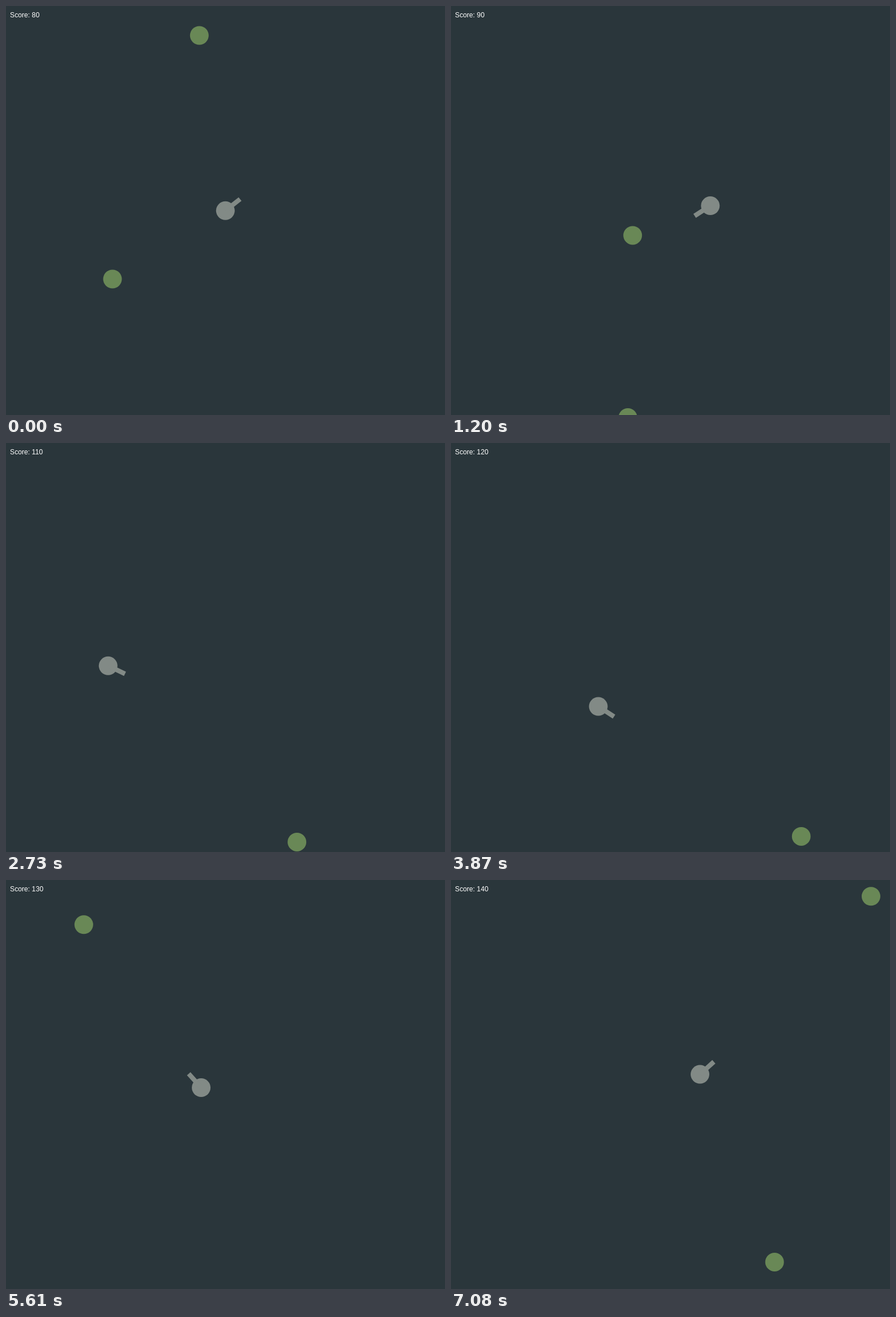
An HTML page with a canvas that plays this animation: 775 by 722 pixels, repeating every 7110 ms.

```html
<!DOCTYPE html>
<html lang="en">
<head>
<meta charset="utf-8">
<title>Arena shooter</title>
<style>
  html, body { margin: 0; width: 100%; height: 100%; overflow: hidden; background: #2a363b; }
  canvas { display: block; }
</style>
</head>
<body>
<canvas id="stage" width="775" height="722"></canvas>
<script>
const W = 775, H = 722, R = 16.5;
const LOOP = 7110, TICK = 30, STEP = 10;
const RUN = 0.25, CHASE = 0.128; // px per ms
const ctx = document.getElementById('stage').getContext('2d');

// Held movement keys: [from, to] in ms
const keys = {
  left: [[1288, 2421], [5200, 5362], [6242, 6494]],
  right: [[918, 1223], [3551, 3974], [4640, 5036], [5610, 6242]],
  up: [[950, 985], [1500, 1744], [4866, 5288], [5630, 5742]],
  down: [[2323, 3017], [3900, 3928], [6480, 6498]]
};

// Where the mouse rests: [time, x, y]
const mouse = [
  [0, 640, 162], [700, 345, 150], [900, 345, 165], [1200, 320, 442],
  [2200, 320, 570], [2730, 440, 518], [3870, 440, 581], [4560, 440, 560],
  [5610, 200, 205], [6480, 215, 215], [7080, 640, 162]
];

const enemies = [
  { born: 0, shot: 900, x: 341.3, y: 52 },
  { born: 0, shot: 1320, x: 188, y: 482 },
  { born: 1100, shot: 2520, x: 308, y: H + R },
  { born: 2365, shot: 3660, x: 545.5, y: H + R },
  { born: 3230, shot: 4440, x: 690, y: 734 },
  { born: 4710, shot: 6300, x: 73, y: -R },
  { born: 6541, shot: LOOP, x: 596.7, y: H + R },
  { born: 6590, shot: LOOP, x: 784.9, y: -R }
];

const clamp = (v, lo, hi) => Math.min(hi, Math.max(lo, v));
const held = (spans, t) => spans.reduce((sum, [from, to]) => sum + clamp(t, from, to) - from, 0);

function playerAt(t) {
  return {
    x: 387.3 + RUN * (held(keys.right, t) - held(keys.left, t)),
    y: 361.3 + RUN * (held(keys.down, t) - held(keys.up, t))
  };
}

function mouseAt(t) {
  const next = mouse.findIndex(m => m[0] > t);
  const [t1, x1, y1] = mouse.at(next);
  const [t0, x0, y0] = mouse[next < 0 ? mouse.length - 1 : next - 1];
  const k = t1 > t0 ? (t - t0) / (t1 - t0) : 0;
  const ease = k * k * (3 - 2 * k);
  return { x: x0 + (x1 - x0) * ease, y: y0 + (y1 - y0) * ease };
}

const angle = (a, b) => Math.atan2(b.y - a.y, b.x - a.x);

// Walk from the spawn point, always towards the player
function enemyAt(enemy, t) {
  const pos = { x: enemy.x, y: enemy.y };
  for (let now = enemy.born; now < t; now += STEP) {
    const dir = angle(pos, playerAt(now));
    const length = CHASE * Math.min(STEP, t - now);
    pos.x += Math.cos(dir) * length;
    pos.y += Math.sin(dir) * length;
  }
  return pos;
}

function disc({ x, y }, color) {
  ctx.fillStyle = color;
  ctx.beginPath();
  ctx.arc(x, y, R, 0, Math.PI * 2);
  ctx.fill();
}

function drawPlayer(pos, turn) {
  disc(pos, '#828a86');
  ctx.save();
  ctx.translate(pos.x, pos.y);
  ctx.rotate(turn);
  ctx.fillRect(0, -R / 4, R * 2, R / 2);
  ctx.restore();
}

function draw(t) {
  ctx.fillStyle = '#2a363b';
  ctx.fillRect(0, 0, W, H);

  const alive = enemies.filter(e => t >= e.born && t < e.shot);
  alive.forEach(e => disc(enemyAt(e, t), '#698856'));

  const player = playerAt(t);
  drawPlayer(player, angle(player, mouseAt(t)));

  const kills = enemies.filter(e => t >= e.shot).length;
  ctx.fillStyle = '#fff';
  ctx.font = '12.2px "Liberation Sans", Arial, sans-serif';
  ctx.fillText('Score: ' + (80 + 10 * kills), 7, 20);
}

const start = performance.now();
function frame() {
  const t = (performance.now() - start) % LOOP;
  draw(Math.floor(t / TICK) * TICK);
  requestAnimationFrame(frame);
}
frame();
</script>
</body>
</html>
```
